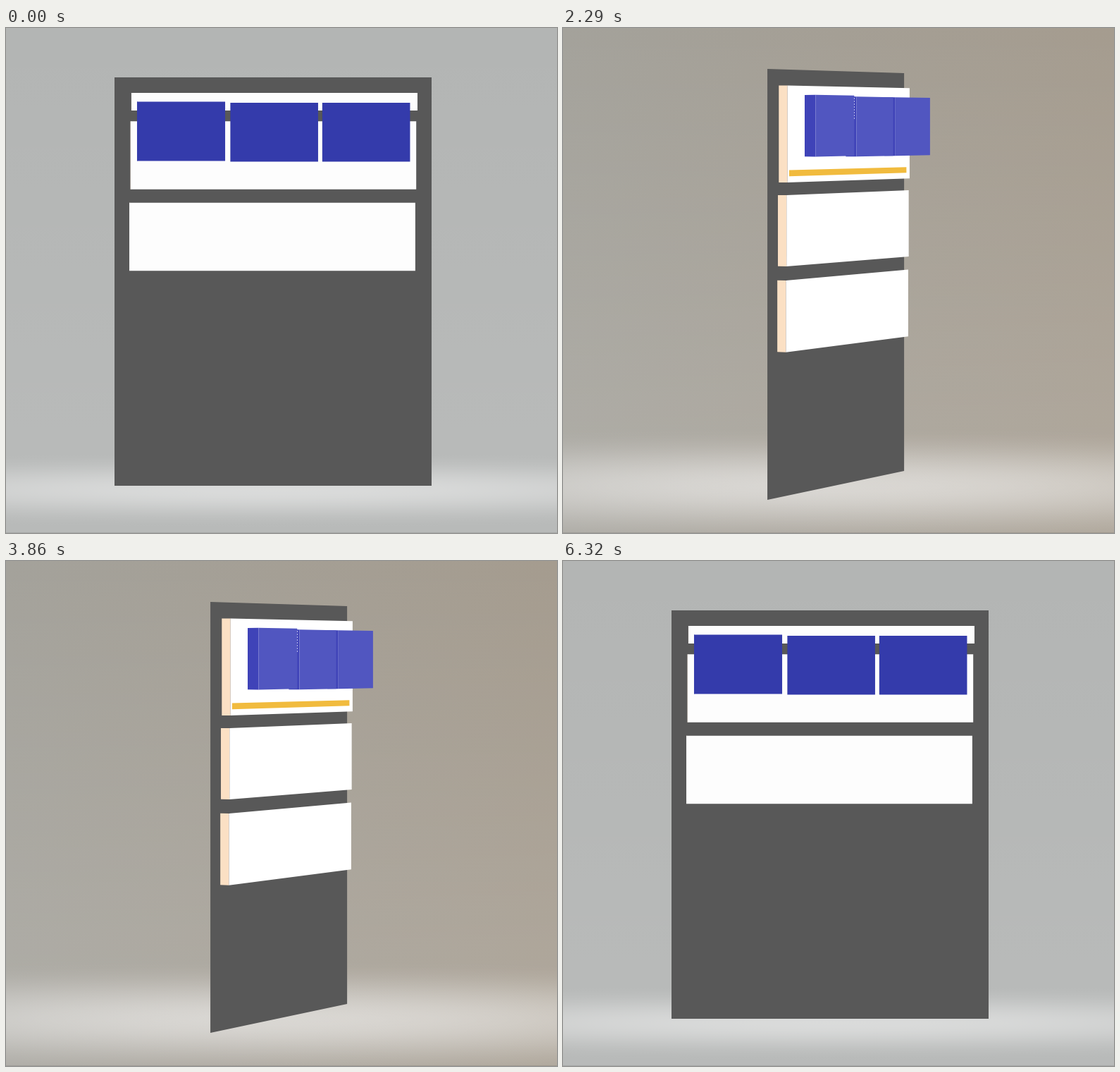
An HTML page with a canvas that plays this animation: 782 by 716 pixels, repeating every 6.78 s.

```html
<!DOCTYPE html>
<html lang="en">
<head>
<meta charset="utf-8">
<title>Layered board</title>
<style>
html, body { margin: 0; width: 100%; height: 100%; overflow: hidden; }
canvas { display: block; }
</style>
</head>
<body>
<canvas id="stage" width="782" height="716"></canvas>
<script>
const W = 782, H = 716, LOOP = 6780;
const SIDE_ANGLE = 64.86 * Math.PI / 180, CAMERA = 5155;
const ctx = document.getElementById('stage').getContext('2d');

// The camera swings in held steps between the front (0) and the side (1).
const SWING = [0.005, 0.148, 0.52, 0.86, 1];
const TURNS = [
  { times: [460, 540, 630, 710], to: 1 },
  { times: [2920, 3000, 3090, 3170, 3250], to: 0 },
  { times: [3530, 3600, 3690, 3770, 3860], to: 1 },
  { times: [6070, 6150, 6240, 6320], to: 0 }
];

function turnAt(t) {
  let turn = 0;
  for (const { times, to } of TURNS) {
    const done = times.filter(s => s <= t).length;
    if (!done) break;
    const p = SWING[done - 1 + SWING.length - times.length];
    turn = to ? p : 1 - p;
  }
  return turn;
}

const mix = (a, b, k) => a + (b - a) * k;
const rgb = (a, b, k) => `rgb(${a.map((v, i) => Math.round(mix(v, b[i], k)))})`;

function project(turn) {
  const sin = Math.sin(turn * SIDE_ANGLE), cos = Math.cos(turn * SIDE_ANGLE);
  return (x, y, z) => {
    const w = 1 - 0.0145 * sin + (x * sin - z * cos) / CAMERA;
    return [391 + ((x - 12) * cos + (z + 5.6) * sin) / w, 144 - 8.8 * sin + y / w];
  };
}

function poly(points, fill) {
  ctx.fillStyle = fill;
  ctx.beginPath();
  points.forEach(p => ctx.lineTo(...p));
  ctx.fill();
}

function box(at, [x0, x1, y0, y1, back, front], face, edge) {
  if (edge) poly([at(x0, y0, back), at(x0, y0, front), at(x0, y1, front), at(x0, y1, back)], edge);
  poly([at(x0, y0, front), at(x1, y0, front), at(x1, y1, front), at(x0, y1, front)], face);
}

function backdrop(turn) {
  const tint = turn * turn;
  let g = ctx.createLinearGradient(0, 0, W, 0);
  g.addColorStop(0, rgb([179, 181, 180], [164, 162, 155], tint));
  g.addColorStop(1, rgb([179, 181, 180], [165, 156, 143], tint));
  ctx.fillStyle = g;
  ctx.fillRect(0, 0, W, H);

  g = ctx.createLinearGradient(0, 0, 0, 600);
  g.addColorStop(0, 'rgba(255,255,255,0)');
  g.addColorStop(1, `rgba(255,255,255,${mix(0.07, 0.11, turn)})`);
  ctx.fillStyle = g;
  ctx.fillRect(0, 0, W, H);

  // Wide glow on the floor
  g = ctx.createRadialGradient(0, 0, 0, 0, 0, 1);
  const peak = mix(0.48, 0.53, turn);
  for (let i = 0; i <= 10; i++) {
    const a = peak * (1 + Math.cos(Math.PI * i / 10)) / 2;
    g.addColorStop(i / 10, `rgba(255,255,255,${a})`);
  }
  ctx.save();
  ctx.translate(391, mix(655, 650, turn));
  ctx.scale(1150, mix(55, 84, turn));
  ctx.fillStyle = g;
  ctx.fillRect(-1, -1, 2, 2);
  ctx.restore();
  ctx.fillStyle = 'rgba(0,0,0,0.1)';
  ctx.fillRect(0, H - 1, W, 1);
}

function draw(t) {
  const turn = turnAt(t), at = project(turn), lit = turn ** 6;
  const lowered = t >= 1570 && t < 5210;
  const tall = t >= 2130 && t < 4650;
  const barred = t >= 2290 && t < 4490;
  const white = rgb([253, 253, 253], [255, 255, 255], turn);
  const cream = rgb([255, 221, 190], [251, 224, 196], lit);
  const blue = rgb([52, 59, 171], [81, 86, 192], lit);
  const navy = rgb([44, 47, 130], [63, 67, 184], lit);

  backdrop(turn);
  box(at, [-225, 225, -74, 505, 0, 0], '#585858');
  const panels = [
    [-200.3, 204.3, -51.8, tall ? 78.9 : -26.9, 5, 18],
    lowered ? [-199, 205.6, 96, 192, 3, 16] : [-201.6, 202.6, -11.7, 84.4, 3, 16],
    lowered ? [-200.8, 203.8, 211, 307.6, 3, 16] : [-203.3, 201.3, 103.4, 199.7, 3, 16]
  ];
  panels.forEach(p => box(at, p, white, cream));
  if (barred) box(at, [-195.1, 193, 62.3, 70.6, 18, 18], rgb([232, 178, 50], [241, 187, 62], lit));

  // Far to near
  box(at, [69.4, 192.5, -37.6, 45, 39.2, 55.5], blue, navy);
  box(at, [-59.7, 63.4, -37.6, 45, 39.2, 55.5], blue, navy);
  box(at, [-190.8, -67.1, -39.1, 44, 39.2, 55.5], blue, navy);
  if (turn === 1) {
    ctx.fillStyle = 'rgba(215,215,245,0.8)';
    for (let y = 99; y < 130; y += 4) ctx.fillRect(413, y, 1, 2);
  }
}

function tick() {
  draw(performance.now() % LOOP);
  requestAnimationFrame(tick);
}
tick();
</script>
</body>
</html>
```
